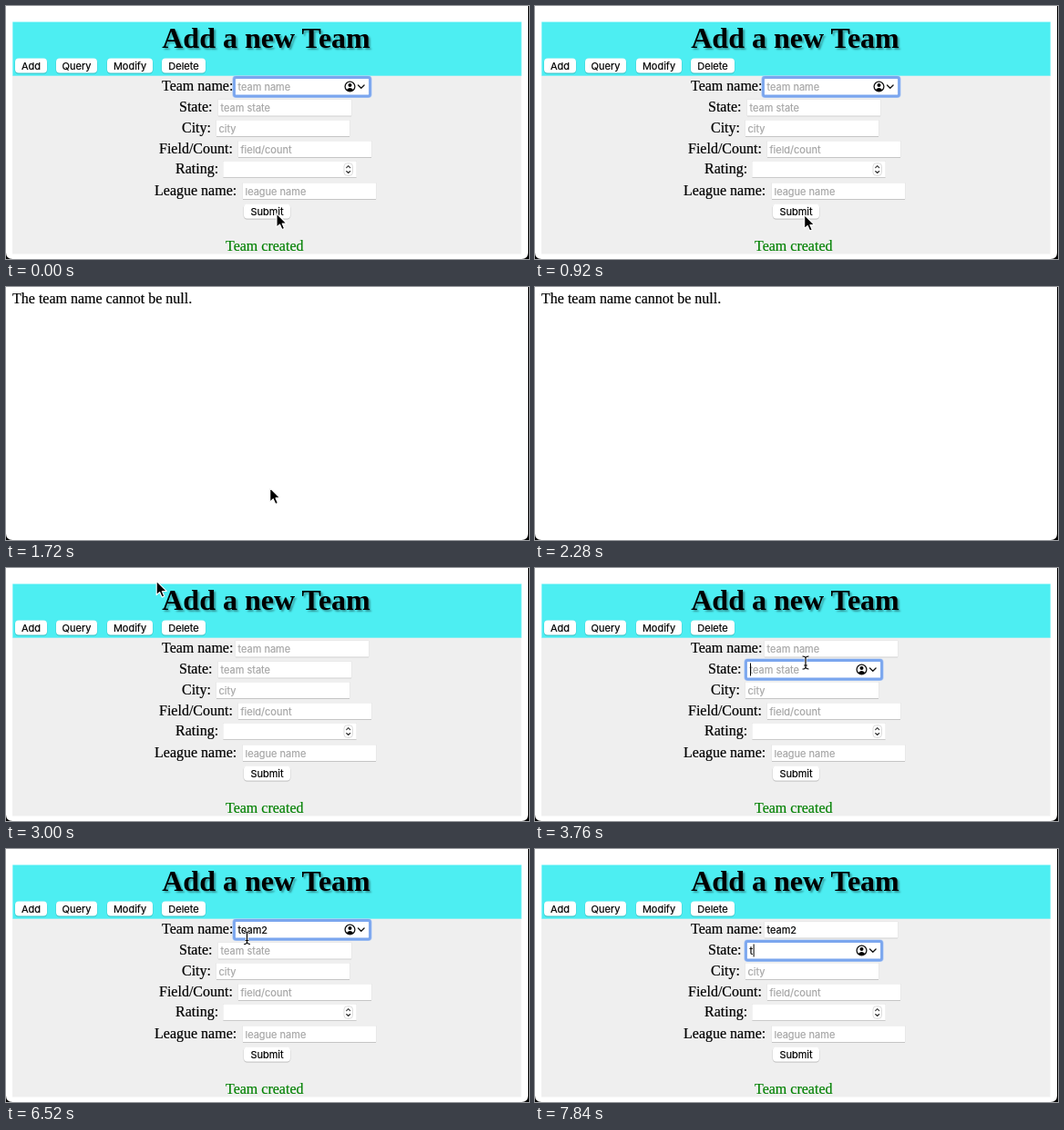
Write an HTML page that moves like this. It is 574 px wide and 278 px high and loops after 8 s.

```html
<!DOCTYPE html>
<html lang="en">
<head>
<meta charset="utf-8">
<title>Add a new Team</title>
<style>
  html, body { margin: 0; width: 100%; height: 100%; overflow: hidden; background: #000; }
  svg { display: block; width: 574px; height: 278px; }
  text { white-space: pre; stroke: currentColor; stroke-width: .2; }
  .label { font: 16px "Liberation Serif", serif; }
  .title { font: bold 32px "Liberation Serif", serif; stroke: none; text-shadow: 2px 2px 2px rgba(0, 0, 0, .35); }
  .ui { font: 11px Inter, sans-serif; }
  .line { fill: none; stroke: #111; stroke-width: 1.3; stroke-linecap: round; stroke-linejoin: round; }
</style>
</head>
<body>
<svg id="stage" viewBox="0 0 574 278"></svg>
<script>
const LOOP = 8000, STEP = 40, BLINK = 500;
const stage = document.getElementById('stage');

function el(parent, tag, attrs = {}, text) {
  const node = document.createElementNS('http://www.w3.org/2000/svg', tag);
  for (const key in attrs) node.setAttribute(key, attrs[key]);
  if (text !== undefined) node.textContent = text;
  parent.appendChild(node);
  return node;
}
const rect = (parent, x, y, width, height, fill, rx = 0, more = {}) =>
  el(parent, 'rect', { x, y, width, height, fill, rx, ...more });
const write = (parent, cls, x, y, text, more = {}) =>
  el(parent, 'text', { class: cls, x, y, color: '#000', fill: 'currentColor', ...more }, text);
const show = (node, on) => node.setAttribute('visibility', on ? 'inherit' : 'hidden');

// Window
rect(stage, 0, 0, 574, 278, '#000');
el(stage, 'path', { d: 'M0 0H573V271Q573 278 566 278H7Q0 278 0 271Z', fill: '#fff' });

// Error page
const errorPage = el(stage, 'g');
write(errorPage, 'label', 7, 18, 'The team name cannot be null.');

// Form page
const form = el(stage, 'g');
rect(form, 7, 76, 558.5, 196.5, '#efefef');
rect(form, 7.5, 17.7, 558, 58.8, '#4deef2', 0, { stroke: '#4deef2', 'stroke-opacity': .35 });
write(form, 'title', 285.5, 46.3, 'Add a new Team', { 'text-anchor': 'middle' });

function button(x, y, w, text) {
  rect(form, x - .4, y + .2, w + .8, 17, '#000', 4.2, { opacity: .16 });
  const face = rect(form, x, y, w, 16, '#fff', 4);
  write(form, 'ui', x + w / 2, y + 12, text, { 'text-anchor': 'middle' });
  return face;
}
button(10, 57.5, 35, 'Add');
button(55, 57.5, 45, 'Query');
button(111, 57.5, 50, 'Modify');
button(171, 57.5, 48, 'Delete');
const submit = button(261, 217.5, 51, 'Submit');

function field(label, labelX, base, x, hint) {
  const y = base - 13, w = 146, h = 17.5;
  write(form, 'label', labelX, base, label);
  rect(form, x - .5, y - .5, w + 1, h + 1, '#e4e4e4');
  rect(form, x, y + h, w, .8, '#bdbdbd');
  rect(form, x, y, w, h, '#fff');
  const ring = el(form, 'g');
  const outline = (grow, stroke, width) =>
    rect(ring, x - grow, y - grow, w + 2 * grow, h + 2 * grow, '#fff', 2, { stroke, 'stroke-width': width });
  outline(1.8, '#b4cdf5', 3.6);
  outline(1.5, '#7ba6ee', 2.8);
  const icon = el(ring, 'g', { transform: `translate(${x + 125.5} ${y + 8.5})` });
  el(icon, 'circle', { class: 'line', r: 5.4 });
  el(icon, 'circle', { cy: -1.5, r: 2 });
  el(icon, 'path', { d: 'M-3.8 3.7Q0 -.7 3.8 3.7Q0 6.7 -3.8 3.7Z' });
  el(icon, 'path', { class: 'line', d: 'M9 -1.5L12.3 1.7L15.6 -1.5' });
  const text = write(form, 'ui', x + 2.5, base, hint);
  const caret = rect(form, x + 3, y + 1.5, 1, 14, '#000');
  return { x, y, w, h, hint, ring, text, caret };
}
const fields = {
  team: field('Team name:', 171, 93, 252, 'team name'),
  state: field('State:', 190, 116, 233, 'team state'),
  city: field('City:', 193, 138.5, 231, 'city'),
  court: field('Field/Count:', 168, 161.5, 255, 'field/count'),
  rating: field('Rating:', 186, 183.6, 238.5, ''),
  league: field('League name:', 163, 207.5, 260, 'league name')
};
rect(form, 371, 172.8, 9.5, 13.5, '#fff', 3.5, { stroke: '#d4d4d4', 'stroke-width': .8 });
el(form, 'path', {
  class: 'line', style: 'stroke: #333; stroke-width: 1.1',
  d: 'M373.7 177.6L375.7 175.6L377.7 177.6M373.7 181.5L375.7 183.5L377.7 181.5'
});
write(form, 'label', 241, 268.7, 'Team created', { color: '#008000' });

// Pointers
const arrow = el(stage, 'path', {
  d: 'M0 0V15.2L3.5 12L6 17.6L8.6 16.5L6.2 11H11Z',
  fill: '#000', stroke: '#fff', 'stroke-width': 1.1, 'stroke-linejoin': 'round'
});
const beam = el(stage, 'g');
for (const [stroke, width] of [['#fff', 2.6], ['#000', 1.2]]) {
  el(beam, 'path', {
    d: 'M-3.5 -7Q0 -7 0 -4.5Q0 -7 3.5 -7M0 -4.5V4.5M-3.5 7Q0 7 0 4.5Q0 7 3.5 7M-1.8 3H1.8',
    fill: 'none', stroke, 'stroke-width': width
  });
}

// Each event changes part of the state; focus and typing restart the caret blink.
const events = [
  [0, { page: 'form', focus: 'team', blink: 80, team: '', state: '', pressed: false, pointer: true }],
  [1440, { focus: '', pressed: true }],
  [1640, { page: 'error', pressed: false }],
  [2840, { page: 'form' }],
  [3400, { focus: 'state', blink: 3400 }],
  [4060, { focus: 'team', blink: 4060 }],
  [4840, { team: 't', blink: 4840, pointer: false }],
  [5040, { team: 'te', blink: 5040 }],
  [5200, { team: 'tea', blink: 5200 }],
  [5480, { team: 'team', blink: 5480 }],
  [5880, { team: 'team2', blink: 5880 }],
  [6240, { pointer: true }],
  [7100, { focus: 'state', blink: 7100 }],
  [7760, { state: 't', blink: 7760, pointer: false }]
];

// Pointer path: time, x, y
const path = [
  [0, 297, 228], [40, 297, 228], [200, 297, 235], [360, 297, 235], [680, 296, 230],
  [840, 296, 230], [1300, 292, 224], [1680, 292, 224], [2280, 116, -20],
  [2800, 118, -20], [3400, 300, 113], [3600, 300, 113], [3760, 297, 104],
  [4060, 302, 88], [6200, 302, 88], [6520, 264.5, 97.5], [6720, 264.5, 97.5],
  [6960, 270, 122], [7160, 266, 113], [LOOP, 266, 113]
];

function pointerAt(t) {
  const i = Math.max(1, path.findIndex(p => p[0] > t));
  const [t0, x0, y0] = path[i - 1], [t1, x1, y1] = path[i];
  const u = (t - t0) / (t1 - t0), k = u * u * (3 - 2 * u);
  return [x0 + (x1 - x0) * k, y0 + (y1 - y0) * k];
}

function draw(time) {
  const t = Math.floor((time % LOOP) / STEP) * STEP;
  const now = {};
  for (const [at, change] of events) if (at <= t) Object.assign(now, change);

  const onForm = now.page === 'form';
  show(form, onForm);
  show(errorPage, !onForm);
  submit.setAttribute('fill', now.pressed ? '#ececec' : '#fff');

  const lit = Math.floor((t - now.blink) / BLINK) % 2 === 0;
  for (const name in fields) {
    const f = fields[name], value = now[name] || '', focused = now.focus === name;
    f.text.textContent = value || f.hint;
    f.text.setAttribute('color', value ? '#000' : '#a6a6a6');
    show(f.ring, focused);
    show(f.caret, focused && lit);
    if (focused) {
      const end = value ? f.text.getComputedTextLength() : 0;
      f.caret.setAttribute('x', f.x + 3 + end);
    }
  }

  const [x, y] = pointerAt(t);
  const overField = onForm && Object.values(fields).some(f =>
    x >= f.x && x <= f.x + f.w && y >= f.y && y <= f.y + f.h);
  for (const node of [arrow, beam]) node.setAttribute('transform', `translate(${x} ${y})`);
  show(arrow, now.pointer && !overField);
  show(beam, now.pointer && overField);
}

const start = performance.now();
function tick() {
  draw(performance.now() - start);
  requestAnimationFrame(tick);
}
tick();
</script>
</body>
</html>
```
